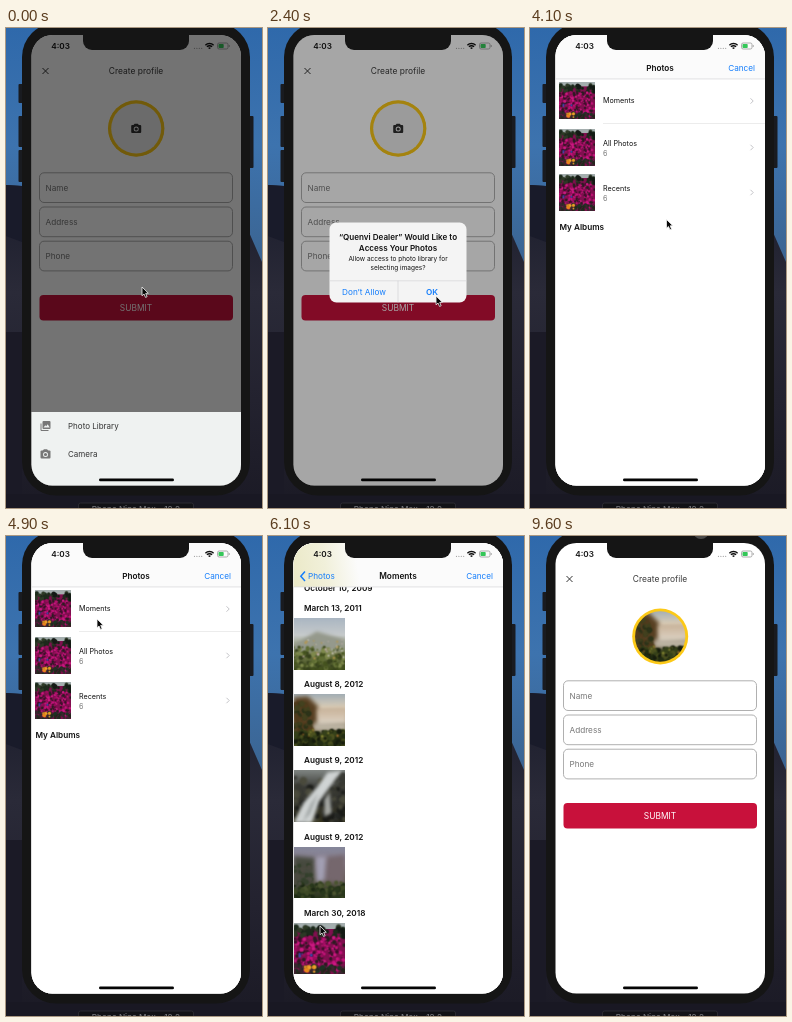
These frames come from a looping animation (256 px wide and 480 px high, 9.7 s). An HTML page with a canvas:

```html
<!DOCTYPE html>
<html lang="en">
<head>
<meta charset="utf-8">
<title>Create profile</title>
<style>
html, body { margin: 0; width: 256px; height: 480px; overflow: hidden; background: #16151f; }
canvas { display: block; }
</style>
</head>
<body>
<canvas id="stage" width="256" height="480"></canvas>
<script>
const LOOP = 9700, STEP = 100;
const BLUE = '#157efb', YELLOW = '#fcc917', RED = '#c8113b';
const SCREEN = { x: 25.5, y: 7, w: 209.5, h: 450.5 };
let ctx = document.getElementById('stage').getContext('2d');

const clamp = v => Math.max(0, Math.min(1, v));
const span = (t, from, to) => clamp((t - from) / (to - from));
const smooth = k => k * k * (3 - 2 * k);
const easeOut = k => 1 - (1 - k) ** 2;

function rect(x, y, w, h, fill) {
  ctx.fillStyle = fill;
  ctx.fillRect(x, y, w, h);
}
function round(x, y, w, h, r, fill, stroke, lineWidth = 1) {
  ctx.beginPath();
  ctx.roundRect(x, y, w, h, r);
  if (fill) { ctx.fillStyle = fill; ctx.fill(); }
  if (stroke) { ctx.strokeStyle = stroke; ctx.lineWidth = lineWidth; ctx.stroke(); }
}
function disc(x, y, r, fill) {
  ctx.beginPath();
  ctx.arc(x, y, r, 0, 7);
  ctx.fillStyle = fill;
  ctx.fill();
}
function poly(points, fill) {
  ctx.beginPath();
  points.forEach(([x, y]) => ctx.lineTo(x, y));
  ctx.closePath();
  ctx.fillStyle = fill;
  ctx.fill();
}
function line(points, color, width = 1) {
  ctx.beginPath();
  points.forEach(([x, y], i) => i ? ctx.lineTo(x, y) : ctx.moveTo(x, y));
  ctx.strokeStyle = color;
  ctx.lineWidth = width;
  ctx.stroke();
}
function text(label, x, y, color = '#111', size = 8.2, weight = 400, align = 'left') {
  ctx.font = `${weight} ${size}px Inter, sans-serif`;
  ctx.textAlign = align;
  ctx.textBaseline = 'alphabetic';
  ctx.fillStyle = color;
  ctx.fillText(label, x, y + size * 0.36);
}
function vertical(y0, y1, ...colors) {
  const g = ctx.createLinearGradient(0, y0, 0, y1);
  colors.forEach((c, i) => g.addColorStop(i / (colors.length - 1), c));
  return g;
}
function layer(draw) {
  ctx.save();
  draw();
  ctx.restore();
}

// Small pictures, painted once on a 100 x 100 square; soft() blurs what follows.
function picture(seed, paint) {
  const canvas = document.createElement('canvas');
  canvas.width = canvas.height = 100;
  const outer = ctx;
  ctx = canvas.getContext('2d');
  const random = () => (seed = seed * 16807 % 2147483647) / 2147483647;
  const scatter = (n, y0, y1, size, colors, x0 = 0, x1 = 100) => {
    for (let i = 0; i < n; i++) {
      disc(x0 + random() * (x1 - x0), y0 + random() * (y1 - y0),
        size * (0.5 + random()), colors[i % colors.length]);
    }
  };
  const soft = px => ctx.filter = px ? `blur(${px}px)` : 'none';
  paint(scatter, soft);
  ctx = outer;
  return canvas;
}

const flowers = picture(11, (scatter, soft) => {
  rect(0, 0, 100, 100, '#80104f');
  rect(0, 0, 100, 12, '#a4aeae');
  soft(1);
  scatter(50, 8, 26, 4.5, ['#1d2b1c', '#2d3a26', '#141a15']);
  scatter(260, 28, 92, 2.8, ['#c4127a', '#9a0d5d', '#3b1029', '#cb1a82', '#2c1c22']);
  scatter(60, 82, 102, 4, ['#25271d', '#3b2630', '#1d3424']);
  scatter(9, 82, 95, 3.5, ['#e8861d', '#f0a62c'], 18, 42);
  scatter(5, 60, 74, 2, ['#3a4bb0'], 5, 40);
});
const meadow = picture(23, (scatter, soft) => {
  rect(0, 0, 100, 100, vertical(0, 100, '#aab6c2', '#c6cacb', '#7d8456', '#3d4a1c'));
  soft(3);
  poly([[0, 52], [45, 26], [72, 34], [100, 42], [100, 64], [0, 66]], '#95998c');
  soft(1.5);
  scatter(150, 56, 102, 3, ['#5f6d33', '#45531f', '#7f8a4c', '#37411d']);
  scatter(34, 42, 80, 1.6, ['#dcd8cf', '#c9b3b0', '#b8964a']);
});
const waterfall = picture(37, (scatter, soft) => {
  rect(0, 0, 100, 100, vertical(0, 100, '#a3aeb4', '#d9cdb8', '#9b8870', '#3a3f1c', '#1c230f'));
  soft(4);
  poly([[0, 6], [28, 4], [48, 24], [48, 70], [0, 80]], '#584023');
  poly([[46, 28], [104, 26], [104, 58], [46, 64]], vertical(26, 64, '#c7b096', '#e3dcd0'));
  rect(38, 56, 66, 16, '#bdb4a4');
  soft(1.5);
  scatter(65, 12, 70, 4, ['#2c3319', '#43411f', '#513b1d'], 0, 34);
  scatter(130, 72, 104, 4.5, ['#232d13', '#36411a', '#4d5220', '#161c0d']);
  scatter(10, 66, 84, 1.8, ['#a86d2a', '#8b8a35']);
});
const stream = picture(41, (scatter, soft) => {
  rect(0, 0, 100, 100, vertical(0, 100, '#7e8380', '#3b3c38', '#33332c', '#38361f'));
  soft(2);
  scatter(80, 12, 104, 6, ['#252724', '#393a34', '#1b1c19', '#4a4a3c']);
  soft(3);
  poly([[66, 4], [94, 0], [72, 30], [50, 60], [36, 102], [0, 102], [20, 62], [46, 32]], '#d0d4d4');
  poly([[34, 64], [48, 44], [32, 84], [18, 100]], '#9da2a2');
  poly([[60, 56], [70, 42], [74, 82], [60, 90]], '#a6a8a4');
});
const canyon = picture(53, (scatter, soft) => {
  rect(0, 0, 100, 100, vertical(0, 100, '#85879b', '#8b7f8b', '#5c5648', '#28331b'));
  soft(4);
  poly([[0, 18], [42, 22], [40, 72], [0, 82]], '#474a3f');
  poly([[50, 22], [100, 16], [100, 74], [55, 66]], '#75676d');
  poly([[44, 20], [64, 18], [60, 66], [44, 70]], '#a3a0b4');
  soft(1.5);
  scatter(110, 70, 104, 4, ['#29381c', '#3d4925', '#1c2814', '#4b5530']);
  scatter(30, 30, 72, 4, ['#34402c', '#4b4a40'], 0, 36);
});

const MOMENTS = [
  ['March 13, 2011', meadow], ['August 8, 2012', waterfall], ['August 9, 2012', stream],
  ['August 9, 2012', canyon], ['March 30, 2018', flowers]
];

function camera(x, y, color, hole) {
  round(x - 5, y - 3.5, 10, 8, 1, color);
  poly([[x - 3, y - 3], [x - 1.6, y - 4.8], [x + 1.6, y - 4.8], [x + 3, y - 3]], color);
  disc(x, y + 0.5, 2.5, hole);
  disc(x, y + 0.5, 1.6, color);
}
function gallery(x, y, color, paper) {
  line([[x - 4.5, y - 2.5], [x - 4.5, y + 4.5], [x + 3, y + 4.5]], color);
  round(x - 3, y - 5, 8, 8, 1, color);
  poly([[x - 2, y + 1.6], [x - 0.2, y - 0.8], [x + 0.8, y + 0.2], [x + 2.2, y - 1.8], [x + 4.2, y + 1.6]], paper);
}

function desktop() {
  rect(0, 0, 256, 480, vertical(0, 235, '#2f69ab', '#3d73ae', '#3b6491'));
  poly([[0, 157], [16, 158], [128, 190], [242, 202], [256, 234], [256, 480], [0, 480]],
    vertical(157, 480, '#1a1c2b', '#2a2a38', '#23222f', '#1b1a25'));
  poly([[0, 157], [16, 158], [16, 214], [0, 208]], '#191b2a');
  rect(0, 304, 16, 176, '#1b1a26');
  rect(0, 466, 256, 14, '#191823');
  round(72.5, 475, 115, 12, 2, '#121216', '#2b2a31');
  text('Phone Nine Max – 12.2', 130, 481.5, '#77777b', 8.2, 500, 'center');
}
function phone() {
  [[56, 19], [88, 31], [122, 32]].forEach(([y, h]) => round(12.5, y, 6, h, 1, '#191b20'));
  round(241, 88, 6.5, 52, 1, '#191b20');
  round(16, -5, 228, 472.5, 34, '#151515');
}
function notch() {
  round(77, -2, 106, 24, [0, 0, 9, 9], '#151515');
}

function statusBar() {
  text('4:03', 45.3, 18, '#161616', 8.2, 600);
  for (let i = 0; i < 4; i++) disc(188.5 + i * 2.4, 20.3, 0.6, '#999');
  [1.2, 3.6, 5.8].forEach(r => {
    ctx.beginPath();
    ctx.arc(203.5, 21.3, r, -Math.PI * 0.75, -Math.PI * 0.25);
    ctx.strokeStyle = '#111';
    ctx.lineWidth = 1.5;
    ctx.stroke();
  });
  round(211.5, 15, 10.5, 6, 1.6, null, '#999', 0.8);
  round(212.5, 16, 5.2, 4, 0.8, '#35c759');
  rect(222.8, 17, 0.8, 2, '#999');
}
function homeBar(color) {
  round(93, 450.5, 75, 2.8, 1.4, color);
}

function avatar(t) {
  const x = 130.2, y = 100.5;
  if (t >= 7900) {
    layer(() => {
      disc(x, y, 28, YELLOW);
      ctx.beginPath();
      ctx.arc(x, y, 25.2, 0, 7);
      ctx.clip();
      ctx.drawImage(waterfall, x - 26, y - 26, 52, 52);
    });
  } else {
    disc(x, y, 28.2, t >= 7000 ? '#d8d3bd' : YELLOW);
    disc(x, y, 27.8, YELLOW);
    if (t < 7000) {
      disc(x, y, 25, '#eeeeee');
      camera(x, y, '#303030', '#eeeeee');
    }
  }
}
function form(t) {
  rect(25, 7, 211, 452, '#fff');
  line([[36.5, 40], [42.5, 46]], '#333', 1);
  line([[42.5, 40], [36.5, 46]], '#333', 1);
  text('Create profile', 130, 43, '#3a3a3a', 8.45, 400, 'center');
  avatar(t);
  ['Name', 'Address', 'Phone'].forEach((label, i) => {
    const y = 144.8 + i * 34.2;
    round(33.5, y, 193, 29.7, 4.5, null, '#b0b0b0');
    text(label, 39.5, y + 15, '#777');
  });
  round(33.5, 267, 193.5, 25.5, 4, RED);
  text('SUBMIT', 130, 279.8, '#fff', 8.4, 400, 'center');
}

function shade(alpha) {
  if (alpha > 0) rect(25, 7, 211, 452, `rgba(0,0,0,${alpha})`);
}
function sheet(t) {
  const k = smooth(span(t, 1165, 1465));
  if (k >= 1) return;
  shade(0.55 * (1 - k) ** 2);
  layer(() => {
    ctx.translate(0, 74 * k);
    const paper = '#eff2f1';
    rect(25, 384, 211, 75, paper);
    if (t >= 1000) rect(25, 384, 140 * span(t, 900, 1200), 28, 'rgba(0,0,0,.035)');
    gallery(39.5, 398, '#777', paper);
    text('Photo Library', 62, 398, '#333', 8);
    camera(39.5, 426, '#777', paper);
    text('Camera', 62, 426, '#333', 8);
  });
}
function permission(t) {
  const shown = easeOut(span(t, 1260, 1660));
  const alpha = shown * (1 - span(t, 2650, 2900));
  if (alpha <= 0) return;
  shade(0.35 * alpha);
  layer(() => {
    const scale = 1.2 - 0.2 * shown;
    ctx.translate(130, 234.5);
    ctx.scale(scale, scale);
    ctx.globalAlpha = alpha;
    round(-68.5, -40, 137, 80, 7, '#f4f4f4');
    const centered = (label, y, size, weight) => text(label, 0, y, '#111', size, weight, 'center');
    centered('“Quenvi Dealer” Would Like to', -25.5, 8.1, 600);
    centered('Access Your Photos', -14.2, 8.1, 600);
    centered('Allow access to photo library for', -3.8, 6.5, 400);
    centered('selecting images?', 5, 6.5, 400);
    line([[-68.5, 18.3], [68.5, 18.3]], '#cfcfd2', 0.6);
    line([[0, 18.3], [0, 40]], '#cfcfd2', 0.6);
    text('Don’t Allow', -34, 29.5, BLUE, 8.2, 400, 'center');
    text('OK', 34, 29.5, BLUE, 8.2, 600, 'center');
  });
}

function albums() {
  rect(25, 51, 211, 408, '#fff');
  const rows = [['Moments', 54, 72.5], ['All Photos', 100.5, 115, '6'], ['Recents', 145.5, 160, '6']];
  rows.forEach(([name, top, y, count]) => {
    ctx.drawImage(flowers, 29, top, 36, 37);
    text(name, 73, y, '#111', 7.2);
    if (count) text(count, 73, y + 10.5, '#777', 7.2);
    const mid = top + 19;
    line([[220.5, mid - 2.7], [223.2, mid], [220.5, mid + 2.7]], '#c4c4c8', 1);
  });
  rect(73, 95, 162, 0.7, '#e4e4e4');
  text('My Albums', 29.5, 199.5, '#111', 8.2, 600);
}
function moments() {
  rect(25, 7, 211, 452, '#fff');
  text('October 10, 2009', 36, 51.8, '#111', 8.2, 600);
  MOMENTS.forEach(([date, image], i) => {
    const y = 72 + i * 76.2;
    text(date, 36, y, '#111', 8.2, 600);
    ctx.drawImage(image, 25.5, y + 10, 51.5, 51.5);
  });
}
function navBar(push) {
  rect(25, 7, 211, 44, '#fbfbfb');
  const tint = ctx.createLinearGradient(25, 30, 88, 20);
  tint.addColorStop(0, '#ebe9c8');
  tint.addColorStop(0.5, '#f1f0da');
  tint.addColorStop(1, '#fbfbfb');
  layer(() => {
    ctx.globalAlpha = push;
    rect(25, 7, 70, 44, tint);
    line([[37, 35.5], [32.8, 40.2], [37, 45]], BLUE, 1.5);
    text('Photos', 40, 40.2, BLUE);
    text('Moments', 130 + 60 * (1 - push), 40.2, '#111', 8.3, 600, 'center');
    ctx.globalAlpha = 1 - push;
    text('Photos', 130 - 70 * push, 40.2, '#111', 8.2, 600, 'center');
  });
  text('Cancel', 225, 40.2, BLUE, 8.2, 400, 'right');
  rect(25, 50.6, 211, 0.7, '#d4d4d6');
}
function picker(t) {
  const up = easeOut(span(t, 3150, 3650)), down = smooth(span(t, 7020, 7500));
  if (up <= 0 || down >= 1) return;
  const push = easeOut(span(t, 5120, 5520));
  layer(() => {
    ctx.translate(0, SCREEN.h * (1 - up + down));
    rect(25, 7, 211, 452, '#fff');
    if (push < 1) layer(() => { ctx.translate(-63 * push, 0); albums(); });
    if (push > 0) layer(() => { ctx.translate(210 * (1 - push), 0); moments(); });
    navBar(push);
  });
}

const CURSOR_PATH = [
  [0, 136, 259], [200, 136, 259], [900, 91.5, 401.5], [1600, 91.5, 401.5], [2300, 168, 268],
  [3100, 169, 269], [3700, 169, 269], [4600, 91, 83], [5200, 91, 83], [5900, 52, 390],
  [6200, 52, 390], [6800, 72, 188], [7500, 77, 192], [8200, 120, 308], [9000, 165, 280],
  [9600, 172, -14], [LOOP, 172, -14]
];
function cursor(t) {
  const i = CURSOR_PATH.findIndex(p => p[0] > t);
  const [t0, x0, y0] = CURSOR_PATH[i - 1], [t1, x1, y1] = CURSOR_PATH[i];
  const k = smooth(span(t, t0, t1));
  layer(() => {
    ctx.translate(x0 + (x1 - x0) * k, y0 + (y1 - y0) * k);
    ctx.lineJoin = 'round';
    poly([[0, 0], [0, 8.8], [2, 7], [3.5, 10.4], [5.1, 9.7], [3.7, 6.4], [6.3, 6.2]], '#080808');
    ctx.strokeStyle = '#f4f4f4';
    ctx.lineWidth = 0.8;
    ctx.stroke();
  });
}

function draw(t) {
  desktop();
  phone();
  layer(() => {
    ctx.beginPath();
    ctx.roundRect(SCREEN.x, SCREEN.y, SCREEN.w, SCREEN.h, 21);
    ctx.clip();
    form(t);
    picker(t);
    statusBar();
    sheet(t);
    homeBar(t >= 1200 && t < 1500 ? '#aaa' : '#050505');
    permission(t);
  });
  notch();
  if (t >= 9600) disc(171, -5, 8, '#4b4b4b');
  cursor(t);
}

const start = performance.now();
function tick() {
  draw(Math.floor((performance.now() - start) % LOOP / STEP) * STEP);
  requestAnimationFrame(tick);
}
tick();
</script>
</body>
</html>
```
